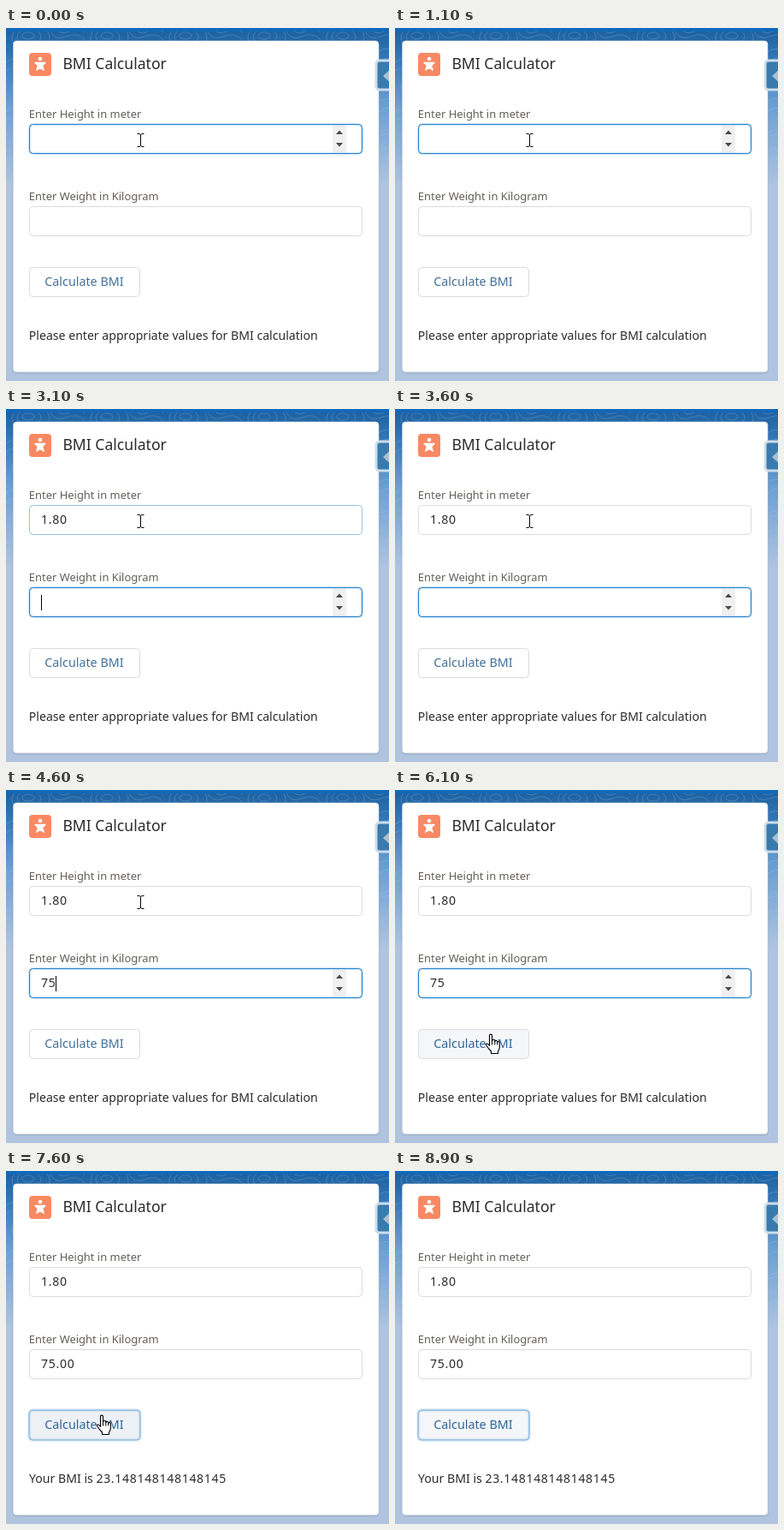
Write an HTML page that moves like this. It is 448 px wide and 412 px high and loops after 9900 ms.

```html
<!DOCTYPE html>
<html lang="en">
<head>
<meta charset="utf-8">
<title>BMI Calculator</title>
<style>
html, body { margin: 0; width: 100%; height: 100%; overflow: hidden; background: #b0c4df; }
svg { display: block; width: 448px; height: 412px; }
text { font: 14.1px "Noto Sans", "Open Sans", sans-serif; fill: #2b2b2b; white-space: pre; }
.title { font-size: 17.6px; }
.label { font-size: 12.95px; fill: #625f5b; }
.num { letter-spacing: .65px; }
.card { fill: #fff; stroke: #d3d9e1; stroke-width: .6; filter: drop-shadow(0 1.5px .8px #0002); }
.box { fill: #fff; stroke: #dddbda; }
.ring { fill: none; stroke: #2482ca; filter: drop-shadow(0 0 1px #6db4ee); }
.ring.soft { stroke: #86b4da; }

/* Every part shares one 9.9 s loop of hard steps; 1% is just under 100 ms. */
.a { animation: 9.9s step-end infinite; }
.h-box { animation-name: h-box; }
.w-box { animation-name: w-box; }
.h-focus { animation-name: h-focus; }
.w-focus { animation-name: w-focus; }
.btn-box { animation-name: btn-box; }
.btn-focus { animation-name: from-click; }
.btn-text { font-size: 14.3px; animation-name: btn-text; }
.h1 { animation-name: h1; }
.h2 { animation-name: h2; }
.h3 { animation-name: h3; }
.h4 { animation-name: h4; }
.w1 { animation-name: w1; }
.w2 { animation-name: w2; }
.w3 { animation-name: from-click; }
.hint { animation-name: hint; }
.result { animation-name: result; }
.caret { animation-name: caret; }
.cursor { animation-name: cursor; }
.beam { animation-name: beam; }
.arrow { animation-name: arrow; }
.hand { animation-name: hand; }

/* typing */
@keyframes h1 { 0% { visibility: hidden } 12.12%, 100% { visibility: visible } }
@keyframes h2 { 0% { visibility: hidden } 14.14%, 100% { visibility: visible } }
@keyframes h3 { 0% { visibility: hidden } 20.2%, 100% { visibility: visible } }
@keyframes h4 { 0% { visibility: hidden } 31.31%, 100% { visibility: visible } }
@keyframes w1 { 0% { visibility: hidden } 43.43%, 100% { visibility: visible } }
@keyframes w2 { 0% { visibility: hidden } 46.46%, 100% { visibility: visible } }
@keyframes from-click { 0% { visibility: hidden } 71.71%, 100% { visibility: visible } }
@keyframes hint { 0% { visibility: visible } 72.72%, 100% { visibility: hidden } }
@keyframes result { 0% { visibility: hidden } 72.72%, 100% { visibility: visible } }
@keyframes caret {
  0% { opacity: 0; transform: translate(41px, 121px) }
  2.02% { opacity: 1; transform: translate(41px, 121px) }
  7.07% { opacity: 0; transform: translate(41px, 121px) }
  12.12% { opacity: 1; transform: translate(49px, 121px) }
  14.14% { opacity: 1; transform: translate(54px, 121px) }
  19.19% { opacity: 0; transform: translate(54px, 121px) }
  20.2% { opacity: 1; transform: translate(62px, 121px) }
  25.25% { opacity: 0; transform: translate(62px, 121px) }
  31.31% { opacity: 1; transform: translate(41px, 217px) }
  36.36% { opacity: 0; transform: translate(41px, 217px) }
  41.41% { opacity: 1; transform: translate(41px, 217px) }
  43.43% { opacity: 1; transform: translate(50px, 217px) }
  46.46% { opacity: 1; transform: translate(58px, 217px) }
  51.51% { opacity: 0; transform: translate(58px, 217px) }
  56.56% { opacity: 1; transform: translate(58px, 217px) }
  61.61% { opacity: 0; transform: translate(58px, 217px) }
  66.66% { opacity: 1; transform: translate(58px, 217px) }
  71.71%, 100% { opacity: 0; transform: translate(58px, 217px) }
}

/* focus and hover */
@keyframes h-focus { 0% { visibility: visible } 31.31%, 100% { visibility: hidden } }
@keyframes w-focus { 0% { visibility: hidden } 31.31% { visibility: visible } 71.71%, 100% { visibility: hidden } }
@keyframes h-box {
  0% { stroke: #dddbda }
  31.31% { stroke: #9bbfe0 }
  32.32% { stroke: #c6d3e0 }
  33.33%, 100% { stroke: #dddbda }
}
@keyframes w-box {
  0% { stroke: #dddbda }
  71.71% { stroke: #b2c8dc }
  72.72% { stroke: #cdd5dd }
  73.73%, 100% { stroke: #dddbda }
}
@keyframes btn-box {
  0% { fill: #fff }
  58.58% { fill: #f9fafc }
  59.59% { fill: #f4f6f9 }
  71.71% { fill: #edf1f6 }
  79.79%, 100% { fill: #f4f6f9 }
}
@keyframes btn-text { 0% { fill: #41709b } 58.58%, 100% { fill: #2d649a } }

/* pointer */
@keyframes cursor {
  0% { opacity: 1; transform: translate(157px, 131px) }
  55.55% { opacity: 1; transform: translate(150px, 172px) }
  56.56% { opacity: 1; transform: translate(138px, 226px) }
  57.57% { opacity: 1; transform: translate(125px, 260px) }
  58.58% { opacity: 1; transform: translate(116px, 287px) }
  59.59% { opacity: 1; transform: translate(112px, 284px) }
  86.86% { opacity: 1; transform: translate(120px, 366px) }
  87.87%, 100% { opacity: 0; transform: translate(120px, 366px) }
}
@keyframes beam {
  0% { visibility: visible }
  55.55% { visibility: hidden }
  56.56% { visibility: visible }
  57.57% { visibility: hidden }
  86.86%, 100% { visibility: visible }
}
@keyframes arrow {
  0% { visibility: hidden }
  55.55% { visibility: visible }
  56.56% { visibility: hidden }
  57.57% { visibility: visible }
  58.58%, 100% { visibility: hidden }
}
@keyframes hand { 0% { visibility: hidden } 58.58% { visibility: visible } 86.86%, 100% { visibility: hidden } }
</style>
</head>
<body>
<svg viewBox="0 0 448 412">
  <defs>
    <linearGradient id="sky" x2="0" y2="1">
      <stop offset="0" stop-color="#1b5f9f"/>
      <stop offset=".06" stop-color="#2c70b0"/>
      <stop offset=".22" stop-color="#6c9fd2"/>
      <stop offset=".45" stop-color="#b0c4df"/>
    </linearGradient>
    <pattern id="contours" width="92" height="58" patternUnits="userSpaceOnUse">
      <g fill="none" stroke="#a5cbed" stroke-opacity=".32" stroke-width=".8">
        <ellipse cx="26" cy="9" rx="7" ry="4"/>
        <ellipse cx="27" cy="10" rx="14" ry="9"/>
        <ellipse cx="29" cy="11" rx="22" ry="15"/>
        <path d="M50 0Q56 16 70 10T92 14M58 0Q64 9 74 4T92 5M0 40Q16 28 30 42T62 34T92 40M0 50Q18 38 32 51T64 44T92 50"/>
      </g>
    </pattern>
    <g id="spinner">
      <path fill="#f0f0f0" d="M382 1.5h16v32h-16z"/>
      <path fill="#4a4a4a" d="M386 12h8l-4-4.5zM386 22h8l-4 4.5z"/>
    </g>
  </defs>

  <rect width="448" height="412" fill="url(#sky)"/>
  <rect y="4" width="448" height="180" fill="url(#contours)"/>
  <rect width="448" height="4" fill="#1268b9"/>

  <rect class="card" x="8.5" y="15" width="427.5" height="386.5" rx="4"/>
  <rect x="433" y="38" width="30" height="34" rx="4" fill="#3a7bad" stroke="#cbdde9" stroke-width="3"/>
  <path fill="#a9c1d0" d="M441 56l7-6.5v13z"/>

  <rect x="27" y="29" width="26" height="27" rx="4" fill="#f88962"/>
  <circle cx="40" cy="36" r="2.3" fill="#fff"/>
  <path d="M34 40.5h12l-3.4 3.2 1.6 5.6-4.2-3-4.2 3 1.6-5.6z" fill="#fff" stroke="#fff" stroke-width="1.3" stroke-linejoin="round"/>
  <text class="title" x="66.4" y="48">BMI Calculator</text>

  <text class="label" x="26.8" y="105">Enter Height in meter</text>
  <rect class="box a h-box" x="27.5" y="112.5" width="389" height="34" rx="4"/>
  <g class="a h-focus">
    <use href="#spinner" y="112"/>
    <rect class="ring" x="27.5" y="112.5" width="389" height="34" rx="4"/>
  </g>
  <text class="num" x="41.1" y="134"><tspan class="a h1">1</tspan><tspan class="a h2">.</tspan><tspan class="a h3">8</tspan><tspan class="a h4">0</tspan></text>

  <text class="label" x="26.8" y="201">Enter Weight in Kilogram</text>
  <rect class="box a w-box" x="27.5" y="208.5" width="389" height="34" rx="4"/>
  <g class="a w-focus">
    <use href="#spinner" y="208"/>
    <rect class="ring" x="27.5" y="208.5" width="389" height="34" rx="4"/>
  </g>
  <text class="num" x="41.1" y="230"><tspan class="a w1">7</tspan><tspan class="a w2">5</tspan><tspan class="a w3">.00</tspan></text>

  <rect class="box a btn-box" x="27.5" y="279.5" width="129" height="34" rx="4"/>
  <rect class="ring soft a btn-focus" x="27" y="279" width="130" height="35" rx="4"/>
  <text class="a btn-text" x="45.3" y="301">Calculate BMI</text>

  <text class="a hint" x="26.8" y="364">Please enter appropriate values for BMI calculation</text>
  <text class="a result" x="27" y="364">Your BMI is <tspan class="num">23.148148148148145</tspan></text>

  <rect class="a caret" width="1" height="18" fill="#000"/>
  <g class="a cursor" stroke="#000" stroke-linejoin="round">
    <path class="a beam" fill="none" d="M-3.5-7.5H-1L.5-6.5 2-7.5H4.5M.5-6.5V6.5M-3.5 7.5H-1L.5 6.5 2 7.5H4.5"/>
    <path class="a arrow" fill="#fff" d="M.5.5V16.5L4.2 13 6.8 18.7 9 17.7 6.5 12.2H11.7z"/>
    <g class="a hand" transform="translate(-6 .5)">
      <path fill="#fff" stroke-width="1.1" d="M4.5 14V2.2Q4.5.6 6 .6T7.5 2.2V8.5Q7.5 7 9.2 7T10.8 8.5V9.2Q10.8 8 12.3 8T13.7 9.5V10.2Q13.7 9 15 9T16.3 10.5V16Q16.3 18 14.5 20.5V23H6.5V20.5Q3 17 .8 13.5 .2 11.8 1.6 11.5 2.8 11.3 4.5 14z"/>
      <path fill="none" d="M7.5 8.5V13M10.8 9V13M13.7 10V13"/>
    </g>
  </g>
</svg>
</body>
</html>
```
